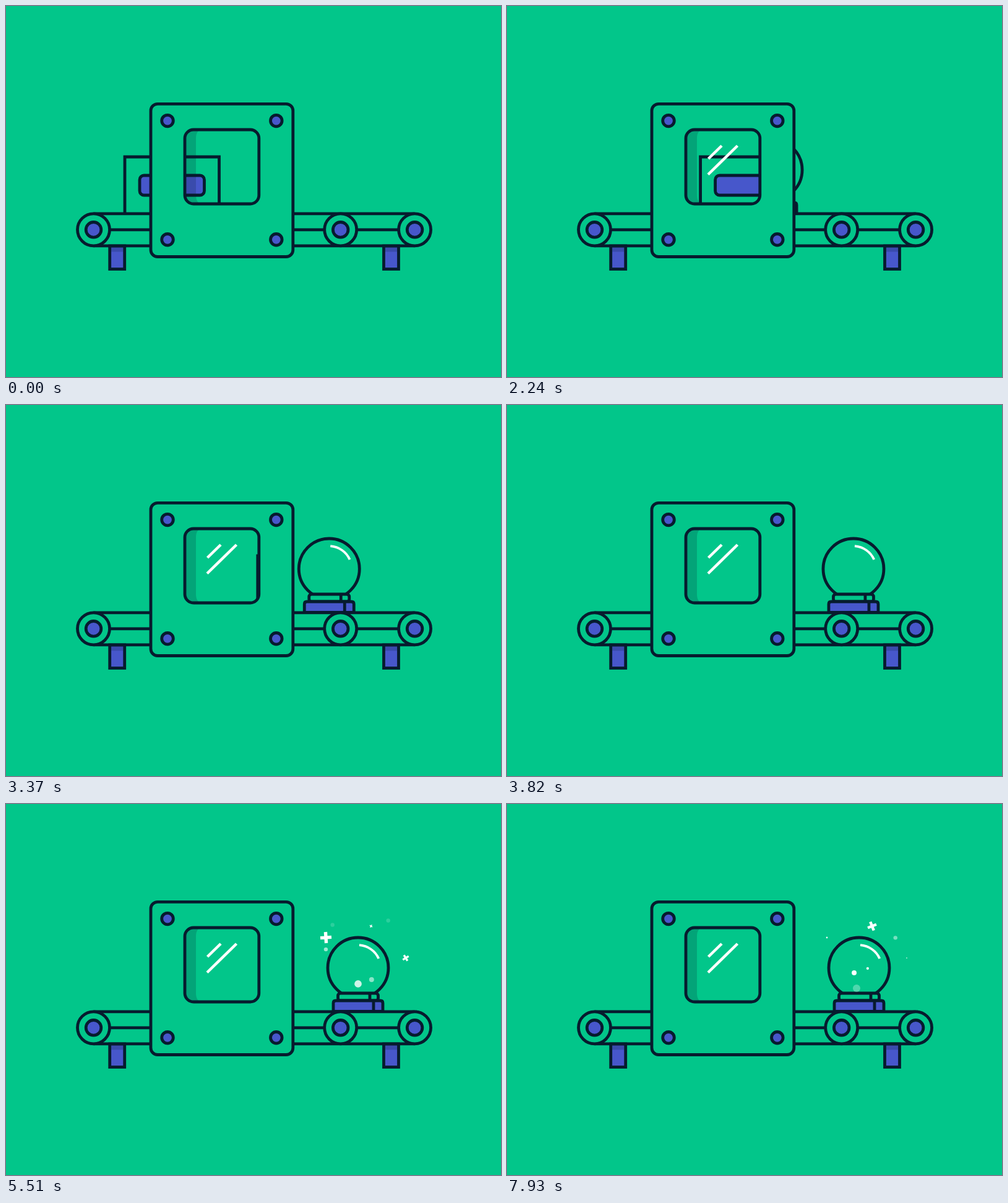
These frames come from a looping animation (800x600 px, 7.99 s). An HTML page:

```html
<!DOCTYPE html>
<html lang="en">
<head>
<meta charset="utf-8">
<title>Conveyor</title>
<style>
  html, body { margin: 0; width: 100%; height: 100%; overflow: hidden; background: #02c68a; }
  svg { display: block; width: 100vw; height: 100vh; }
  .line { fill: none; stroke: #071b2e; stroke-width: 4.8; }
  .line.green { fill: #02c68a; }
  .line.blue { fill: #4757cb; }
  .shade { fill: #071b2e; fill-opacity: .2; }
  .white { fill: none; stroke: #fff; stroke-width: 4.5; }
  .white.thin { stroke-width: 3.8; }
</style>
</head>
<body>
<svg viewBox="0 0 800 600">
  <defs>
    <clipPath id="entry"><rect width="240" height="600"/></clipPath>
    <clipPath id="exit"><rect x="460" width="340" height="600"/></clipPath>
    <clipPath id="pane"><rect x="289" y="200" width="120" height="120" rx="14"/></clipPath>
    <g id="box">
      <path class="line" d="M0 336V244H152.5V336"/>
      <rect class="line blue" x="24" y="274" width="104.5" height="32" rx="7"/>
    </g>
    <g id="pulley">
      <circle class="line green" r="26"/>
      <circle class="line blue" r="12.3"/>
    </g>
    <g id="leg">
      <rect class="line blue" x="-12" y="388" width="24" height="37.5"/>
      <rect class="shade" x="-9.5" y="388" width="19" height="9.5"/>
    </g>
    <circle id="bolt" class="line blue" r="9.3"/>
  </defs>

  <use href="#leg" x="179.7"/>
  <use href="#leg" x="622.5"/>
  <g clip-path="url(#entry)"><use class="cargo" href="#box"/></g>
  <path class="line" d="M141.5 335.8H660.5M141.5 387.8H660.5M141.5 361.8H660.5"/>
  <use href="#pulley" x="141.5" y="361.8"/>
  <use href="#pulley" x="540.7" y="361.8"/>
  <use href="#pulley" x="660.6" y="361.8"/>

  <g clip-path="url(#exit)">
    <g id="globe">
      <circle class="line green" cy="265" r="49"/>
      <path class="white thin" d="M2 228.2A37 37 0 0 1 33.3 250"/>
      <rect class="line green" x="-32.5" y="306" width="65" height="12" rx="4"/>
      <path class="line blue" stroke-linejoin="round" d="M-40 335.5V322Q-40 318 -36 318H36Q40 318 40 322V335.5Z"/>
      <path class="line" d="M19 306V318M25 318V335"/>
    </g>
  </g>

  <rect class="line green" x="234" y="158.3" width="229.8" height="247.2" rx="11"/>
  <use href="#bolt" x="261" y="185.6"/>
  <use href="#bolt" x="436.8" y="185.6"/>
  <use href="#bolt" x="261" y="377.8"/>
  <use href="#bolt" x="436.8" y="377.8"/>
  <g clip-path="url(#pane)">
    <use class="cargo" href="#box"/>
    <path class="shade" d="M289 200H318Q307 200 307 214V306Q307 320 318 320H289Z"/>
  </g>
  <rect class="line" x="289" y="200" width="119.8" height="120" rx="14"/>
  <path class="white glint" pathLength="1" d="M325.5 247L347 226"/>
  <path class="white glint" pathLength="1" d="M325 272.5L372.5 226"/>
  <g id="sparkles" fill="#fff"></g>
</svg>
<script>
const LOOP = 7990;
const STEP = 57.3;          // ms per drawn step
const DEPARTURE = 770;      // the box sets off at step 0
const SPEED = 4.71;         // px per step
const PULSE_PERIOD = 58;    // steps between two pulses of a plus

// born and life are counted in steps
const pluses = [
  { x: 517, y: 216, born: 65, life: 35 },
  { x: 590, y: 197.5, born: 58.6, life: 26.8 },
  { x: 646, y: 249, born: 71.4, life: 55.5 }
];
const flake = (x, y, born, size) => ({ x, y, born, size, life: 78, shrink: 0.045 });
const spark = (x, y, born) => ({ x, y, born, size: 3.2, life: 30, shrink: 0 });
const motes = [
  flake(573, 300, 62, 6.8), flake(593.5, 290, 69, 4.6), flake(566.5, 301.4, 117, 6.4),
  spark(533, 207.5, 55), spark(623, 200.5, 55), spark(520, 242, 67), spark(630, 221.5, 113)
];

const all = selector => [...document.querySelectorAll(selector)];
const clamp = (v, max = 1) => Math.max(0, Math.min(max, v));
const set = (el, attrs) => { for (const name in attrs) el.setAttribute(name, attrs[name]); };
const globe = document.getElementById('globe');
const sparkles = document.getElementById('sparkles');
const cargo = all('.cargo'), glints = all('.glint');

function add(tag, attrs = {}) {
  const el = document.createElementNS(sparkles.namespaceURI, tag);
  set(el, attrs);
  return sparkles.appendChild(el);
}
for (const plus of pluses) plus.el = add('path', { d: 'M-9 0H9M0 -9V9', stroke: '#fff', 'stroke-width': 5.4 });
for (const mote of motes) mote.el = add('circle');

function drawPlus({ el, x, y, born, life }, step) {
  const age = step < born ? 0 : (step - born) % PULSE_PERIOD;
  const u = clamp(age / life);
  const size = Math.sin(Math.PI * u);
  set(el, {
    transform: `translate(${x} ${y}) rotate(${90 * u - 50}) scale(${size})`,
    visibility: size > 0.01 ? 'visible' : 'hidden'
  });
}

// Motes rise with a slight drift, fading in slowly and out quickly.
function drawMote({ el, x, y, born, size, life, shrink }, step) {
  const age = clamp(step - born, life);
  set(el, {
    cx: x - 0.19 * age,
    cy: y - 0.43 * age,
    r: size - shrink * age,
    opacity: clamp(Math.min(age / 26, (life - age) / 12))
  });
}

function draw(time) {
  const step = Math.floor((time - DEPARTURE) / STEP + 0.3);
  const x = 192 + clamp(SPEED * (step + 0.6), 261.5);
  cargo.forEach(el => set(el, { x }));
  set(globe, { transform: `translate(${x + 115.5} 0)` });

  const drawn = clamp((step + 12) / 8);
  glints.forEach(el => set(el, {
    'stroke-dasharray': `${drawn} 2`,
    visibility: drawn > 0 ? 'visible' : 'hidden'
  }));

  pluses.forEach(plus => drawPlus(plus, step));
  motes.forEach(mote => drawMote(mote, step));
}

const start = performance.now();
function tick() {
  draw((performance.now() - start) % LOOP);
  requestAnimationFrame(tick);
}
tick();
</script>
</body>
</html>
```
